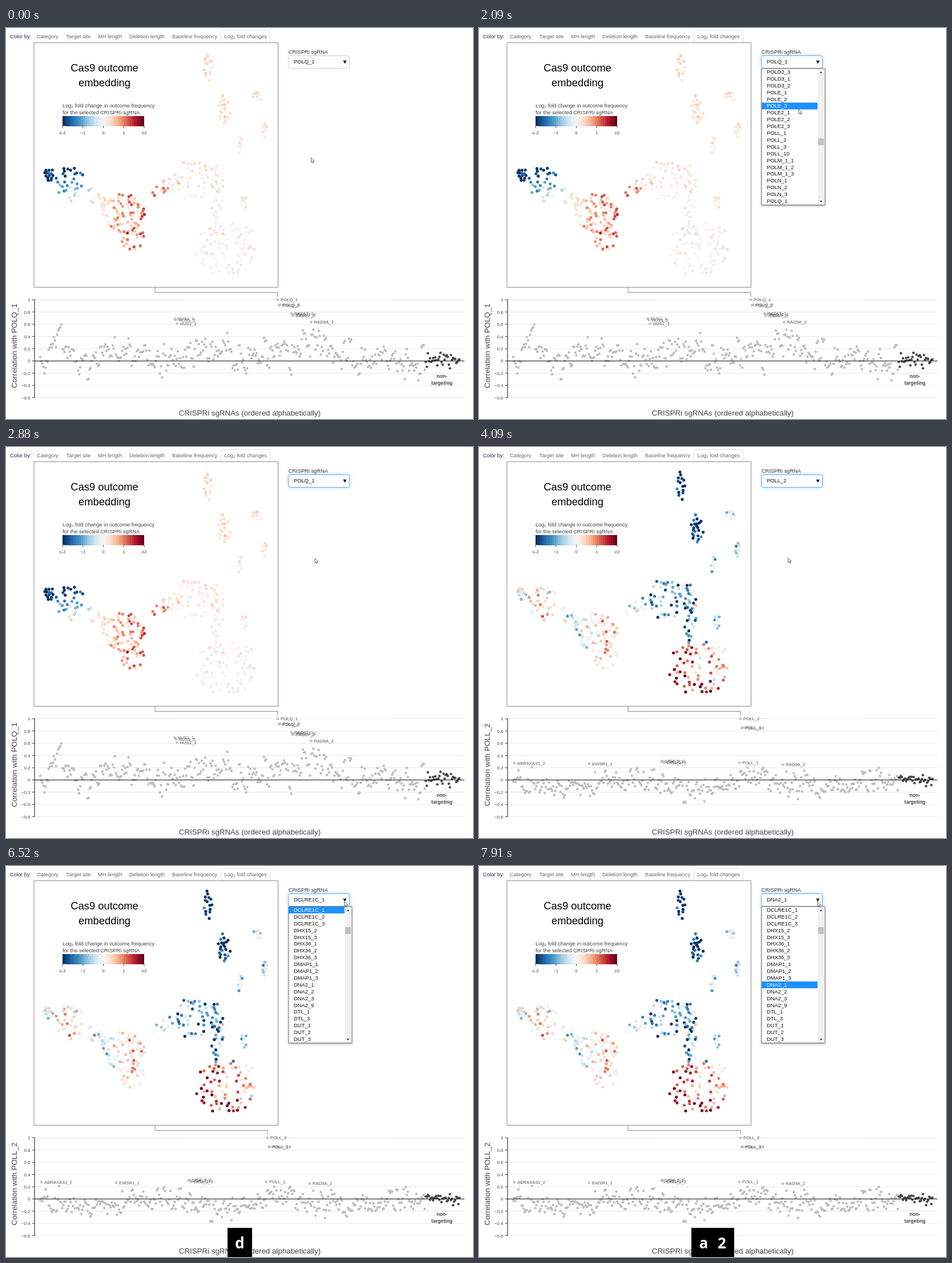
An HTML page with a canvas for the animation above (8000 ms loop, 818 px wide and 684 px high).

```html
<!DOCTYPE html>
<html lang="en">
<head>
<meta charset="utf-8">
<title>Outcome embedding</title>
<style>
  html, body { margin: 0; width: 818px; height: 684px; overflow: hidden; background: #fff; }
  canvas { display: block; }
</style>
</head>
<body>
<canvas id="stage" width="818" height="684"></canvas>
<script>
const ctx = document.getElementById('stage').getContext('2d');
const LOOP = 8000, ROW = 11.9, LIST_TOP = 71;
const SANS = '"Liberation Sans", Arial, sans-serif';

let seed = 7;
const random = () => (seed = (seed * 16807) % 2147483647) / 2147483647;
const noise = () => (random() + random() + random() - 1.5) * 2;
const clamp = (v, lo, hi) => Math.min(hi, Math.max(lo, v));

// ---------- drawing helpers ----------
function text(str, x, y, size, color = '#444', align = 'left', weight = '', family = SANS) {
  ctx.font = `${weight} ${size}px ${family}`;
  ctx.fillStyle = color;
  ctx.textAlign = align;
  ctx.fillText(str, x, y);
}
function line(color, width, ...pts) {
  ctx.strokeStyle = color;
  ctx.lineWidth = width;
  ctx.beginPath();
  for (let i = 0; i < pts.length; i += 2) ctx.lineTo(pts[i], pts[i + 1]);
  ctx.stroke();
}
function triangle(color, x, y, halfWidth, height) {
  ctx.fillStyle = color;
  ctx.beginPath();
  ctx.moveTo(x - halfWidth, y);
  ctx.lineTo(x + halfWidth, y);
  ctx.lineTo(x, y + height);
  ctx.fill();
}
function box(color, x, y, w, h) {
  ctx.fillStyle = color;
  ctx.fillRect(x, y, w, h);
}
function frameBox(color, x, y, w, h, radius = 0) {
  ctx.strokeStyle = color;
  ctx.lineWidth = 1;
  ctx.beginPath();
  ctx.roundRect(x, y, w, h, radius);
  ctx.stroke();
}
function dot(color, x, y, r) {
  ctx.fillStyle = color;
  ctx.beginPath();
  ctx.arc(x, y, r, 0, 7);
  ctx.fill();
}

// ---------- diverging colour scale, -2 to 2 ----------
const SCALE = ['053061', '2166ac', '4393c3', '92c5de', 'd1e5f0', 'f7f7f7',
  'fddbc7', 'f4a582', 'd6604d', 'b2182b', '67001f']
  .map(hex => [0, 2, 4].map(i => parseInt(hex.slice(i, i + 2), 16)));
function heat(v) {
  const p = clamp((v + 2) * 2.5, 0, 9.999), i = Math.floor(p);
  return `rgb(${SCALE[i].map((c, k) => Math.round(c + (SCALE[i + 1][k] - c) * (p - i)))})`;
}

// ---------- embedding: islands of points coloured by two smooth fields ----------
function firstField(x, y) {
  if (x < 150) return Math.min(.3, -2.8 + (y - 240) / 25 + (x - 68) / 120) + noise() * .3;
  const hot = Math.exp(-(((x - 235) / 60) ** 4));
  return .35 - y / 1200 + hot * .75 + noise() * (.17 + hot * .2);
}
function secondField(x, y) {
  if (x < 300) return .35 * Math.cos((x - 115) / 17) + noise() * .4;
  if (x > 400 && y < 320) return -.4 + noise() * .4;
  if (y < 345) return y < 180 ? -2 + noise() * .3 : -1.1 + noise() * .8;
  return 1.4 - (x - 340) / 75 + Math.max(0, y - 395) / 30 + noise() * .55;
}
// centre, radii, number of points, slope
const islands = [
  [353, 68, 8, 26, 15], [381, 142, 14, 25, 22], [441, 119, 9, 9, 8], [453, 180, 6, 12, 8],
  [410, 206, 6, 17, 8], [75, 256, 8, 13, 14], [112, 272, 27, 31, 32], [158, 297, 17, 16, 14, .6],
  [206, 325, 37, 35, 72], [221, 366, 21, 23, 18], [283, 276, 28, 13, 18, -.5],
  [328, 265, 38, 36, 40], [370, 286, 11, 58, 32], [419, 305, 7, 13, 9], [385, 382, 54, 52, 84]
];
const points = [];
for (const [cx, cy, rx, ry, count, slope = 0] of islands) {
  for (let n = 0; n < count; n++) {
    let x, y, tries = 0;
    do {
      const a = random() * 2 * Math.PI, r = Math.sqrt(random());
      x = cx + Math.cos(a) * r * rx;
      y = cy + Math.sin(a) * r * ry + (x - cx) * slope;
    } while (tries++ < 9 && points.some(p => Math.hypot(p.x - x, p.y - y) < 3.6));
    points.push({ x, y, values: [firstField(x, y), secondField(x, y)] });
  }
}

// ---------- correlations: guides of one gene share an offset ----------
const bump = (x, centre, width) => Math.exp(-(((x - centre) / width) ** 2));
const trends = [
  x => .03 + .4 * bump(x, 95, 14) + .2 * bump(x, 185, 25) + .18 * bump(x, 345, 28)
    + .28 * bump(x, 545, 45) + .14 * bump(x, 663, 22),
  x => -.07 + .07 * Math.cos((x - 265) / 36)
];
const guides = [];
let gene;
for (let x = 60, i = 0; x < 796; x += 1.84, i++) {
  if (i % 3 === 0) gene = [noise(), noise()];
  const control = x > 735;
  guides.push({ x, control, values: trends.map((trend, k) => control
    ? noise() * (.06 - k * .015) + k * .01
    : clamp(trend(x) + gene[k] * (.12 - k * .05) + noise() * .07, -.37, .6 - k * .35)) });
}
const screens = [
  { name: 'POLQ_1', x: 476, top: [
    [476, 1, 'POLQ_1'], [478, .91, 'POLQ_2'], [480, .92, 'POLQ_3'],
    [500, .775, 'RAD17_1'], [502, .74, 'RAD17_2'], [504, .76, 'RAD17_3'],
    [534.5, .635, 'RAD9A_3'], [295.5, .69, 'HUS1_1'], [297.5, .67, 'HUS1_2'], [299.5, .61, 'HUS1_3']] },
  { name: 'POLL_2', x: 458, top: [
    [458, 1, 'POLL_2'], [460, .848, 'POLL_3'], [462, .855, 'POLL_10'], [456, .28, 'POLL_1'],
    [532, .25, 'RAD9A_2'], [193, .265, 'EWSR1_1'], [62, .275, 'ABRAXAS1_2'],
    [319.5, .3, 'LIG4_2_1'], [321.5, .31, 'LIG4_2_2'], [324, .28, 'LIG4_2_3']] }
];
const corrY = v => 582.4 - v * 107;

// ---------- option lists ----------
const expand = spec => spec.split(' ').flatMap(item => {
  const [name, ids] = item.split(':');
  return ids.split(',').map(id => `${name}_${id}`);
});
const listP = expand('PAXIP1:3 PMS2:1,2,3 POLA1:1,3 POLD1:1,2 POLD2:1,3 POLD3:1,2 POLE:1,2,3 ' +
  'POLE2:1,2,3 POLL:1,2,3,10 POLM_1:1,2,3 POLN:1,2,3 POLQ:1');
const listD = expand('DCLRE1C:1,2,3 DHX15:2,3 DHX36:1,2,3 DMAP1:1,2,3 DNA2:1,2,3,9 DTL:1,3 DUT:1,2,3');

// ---------- pointer: start, end, steps, curve points, easing ----------
const easeInOut = u => u * u * u * (u * (6 * u - 15) + 10);
const easeOut = u => 1 - Math.pow(1 - u, 2.7);
const moves = [
  [450, 1200, 12, [534.5, 227], [622, 120], [590.5, 56.5], easeInOut],
  [1960, 2560, 10, [590.5, 56.5], [566, 126], [541, 195], easeOut],
  [4090, 4780, 11, [541, 195], [568, 122], [593, 56.5], easeInOut],
  [5370, 5371, 1, [593, 56.5], [593, 60], [593, 62.5], easeOut]
];
function pointerAt(t) {
  let pos = moves[0][3];
  for (const [start, end, steps, a, b, c, ease] of moves) {
    if (t < start) break;
    const step = Math.floor((t - start) / (end - start) * (steps - 1) + 1.1);
    const s = ease(Math.min(1, step / steps));
    pos = [0, 1].map(k => a[k] * (1 - s) ** 2 + 2 * b[k] * s * (1 - s) + c[k] * s * s);
  }
  return pos;
}

// ---------- scene parts ----------
function drawTabs() {
  text('Color by:', 7, 18, 9.3, '#222244');
  const tabs = { 'Category': 54, 'Target site': 105.5, 'MH length': 161, 'Deletion length': 216,
    'Baseline frequency': 291, 'Log₂ fold changes': 382.5 };
  for (const label in tabs) text(label, tabs[label], 18, 9.3, '#666');
  frameBox('#ddd', 376.5, 4.5, 86, 21, [3, 3, 0, 0]);
}
function drawEmbedding(set) {
  frameBox('#888', 49, 25.7, 427.5, 427.8);
  text('Cas9 outcome', 172.5, 76, 18.4, '#000', 'center');
  text('embedding', 172.5, 102, 18.4, '#000', 'center');
  text('Log₂ fold change in outcome frequency', 99, 138.5, 9.3);
  text('for the selected CRISPRi sgRNA', 99, 151, 9.3);
  const slices = 40;
  for (let i = 0; i < slices; i++) {
    const x = Math.round(99 + i * 143 / slices);
    box(heat(-2 + 4 * i / (slices - 1)), x, 154, 242 - x, 17.5);
  }
  ['≤-2', '−1', '0', '1', '≥2'].forEach((label, i) => {
    const x = 99 + i * 35.75;
    line('#444', 1, x, 171.5, x, 175);
    text(label, x, 186, 8, '#444', 'center');
  });
  for (const { x, y, values } of points) dot(heat(values[set]), x, y, 2.6);
}
function drawCorrelation(set) {
  const { name, x: link, top } = screens[set];
  line('#888', 1, 261, 453.5, 261, 462.5, link, 462.5, link, 470);
  for (let i = -3; i <= 5; i++) {
    const y = corrY(i / 5);
    line('#e5e5e5', 1, 50, y, 803, y);
    line('#444', 1, 45.5, y, 50, y);
    text(String(i / 5).replace('-', '−'), 42.5, y + 3, 8, '#444', 'right');
  }
  line('#333', 1.2, 50, 475, 50, 647);
  for (const g of guides) dot(g.control ? '#484848' : '#bdbdbd', g.x, corrY(g.values[set]), 2.2);
  line('#111', 1.1, 50, 582.5, 803, 582.5);
  for (const [x, v, label] of top) {
    dot('#bdbdbd', x, corrY(v), 2.2);
    text(label, x + 5, corrY(v) + 2.8, 7.7, '#555');
  }
  text('non-', 763.5, 612, 8.6, '#444', 'center', 'bold');
  text('targeting', 763.5, 624, 8.6, '#444', 'center', 'bold');
  text('CRISPRi sgRNAs (ordered alphabetically)', 427, 677.5, 13.3, '#444', 'center');
  ctx.save();
  ctx.translate(18.5, 556);
  ctx.rotate(-Math.PI / 2);
  text('Correlation with ' + name, 0, 0, 13.3, '#444', 'center');
  ctx.restore();
}
function drawSelect(value, focused) {
  text('CRISPRi sgRNA', 494.7, 45, 9.3, '#333');
  ctx.save();
  if (focused) {
    ctx.shadowColor = 'rgba(102,175,233,.7)';
    ctx.shadowBlur = 6;
  }
  ctx.fillStyle = '#fff';
  ctx.beginPath();
  ctx.roundRect(495, 48.5, 106.5, 22, 3);
  ctx.fill();
  ctx.restore();
  frameBox(focused ? '#66afe9' : '#ccc', 495, 48.5, 106.5, 22, 3);
  text(value, 504, 62.3, 9.4, '#111');
  triangle('#000', 593.5, 57, 3, 5.5);
}
function drawList(options, active, thumbY) {
  const height = ROW * 20 + .5;
  ctx.save();
  ctx.shadowColor = 'rgba(0,0,0,.4)';
  ctx.shadowBlur = 4;
  ctx.shadowOffsetY = 1;
  box('#fff', 495, LIST_TOP, 111, height);
  ctx.restore();
  options.forEach((label, i) => {
    const y = LIST_TOP + i * ROW;
    if (i === active) box('#1e90ff', 495, y, 98, ROW);
    text(label, 504, y + 8.9, 9.4, i === active ? '#fff' : '#111');
  });
  box('#f1f1f1', 593.3, LIST_TOP, 12, height);
  box('#c1c1c1', 594, thumbY, 10, 12);
  triangle('#505050', 599, 79, 2.5, -3);
  triangle('#505050', 599, 302, 2.5, 3);
  frameBox('#777', 495, LIST_TOP, 111, height);
}
function drawKeys(keys) {
  const width = 11 + keys.length * 32;
  box('#000', 409.5 - width / 2, 633, width, 51);
  keys.forEach((key, i) => text(key, 409.5 + (i - (keys.length - 1) / 2) * 32, 669, 26, '#fff',
    'center', 'bold', '"Open Sans", sans-serif'));
}
const arrow = new Path2D('M0 0V8L1.9 6.3 3.2 9.3 4.6 8.7 3.3 5.8 5.8 5.7Z');
function drawPointer([x, y]) {
  ctx.save();
  ctx.translate(x, y);
  ctx.fillStyle = '#fff';
  ctx.fill(arrow);
  ctx.strokeStyle = '#445';
  ctx.lineWidth = .8;
  ctx.stroke(arrow);
  ctx.restore();
}

function draw(t) {
  const set = t < 2950 ? 0 : 1;
  const pointer = pointerAt(t);
  const value = t >= 6990 ? 'DNA2_1' : t >= 6520 ? 'DCLRE1C_1' : screens[set].name;
  box('#fff', 0, 0, 818, 684);
  drawTabs();
  drawEmbedding(set);
  drawCorrelation(set);
  drawSelect(value, t >= 1420);
  if (t >= 6520) {
    const typed = Math.floor((t - 6520) / 470 + .05) + 1;
    drawList(listD, listD.indexOf(value), 107);
    drawKeys([...'dna2'.slice(Math.max(0, typed - 2), typed)]);
  } else if (t >= 5370) {
    drawList(listP.slice(0, 20), 19, 188);
  } else if (t >= 1480 && t < 2750) {
    const hovered = Math.floor((pointer[1] - LIST_TOP) / ROW);
    drawList(listP.slice(-20), hovered < 0 ? 19 : hovered, 193);
  }
  drawPointer(pointer);
}

const begin = performance.now();
function frame() {
  draw((performance.now() - begin) % LOOP);
  requestAnimationFrame(frame);
}
frame();
</script>
</body>
</html>
```
